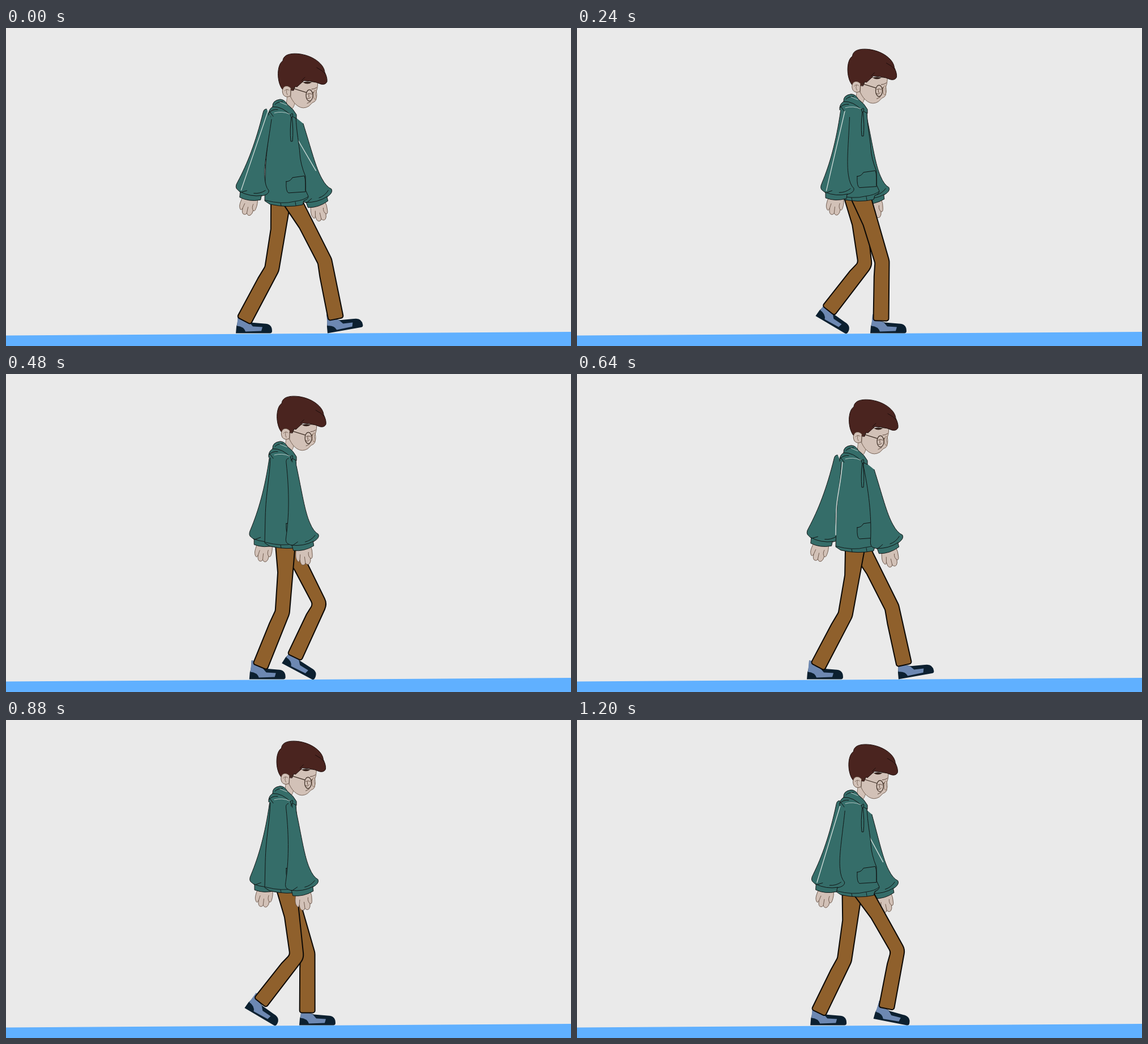
Write an HTML page with a canvas that moves like this. It is 998 px wide and 561 px high and loops after 1.28 s.

```html
<!DOCTYPE html>
<html lang="en">
<head>
<meta charset="utf-8">
<title>Walk cycle</title>
<style>
  html, body { margin: 0; width: 100%; height: 100%; overflow: hidden; background: #eaeaea; }
  canvas { display: block; }
</style>
</head>
<body>
<canvas id="stage" width="998" height="561"></canvas>
<script>
const ctx = document.getElementById('stage').getContext('2d');
const LOOP = 1280, TICK = 80, THIGH = 115, SHIN = 104, GROUND = 538.5;
const INK = '#101313', GREEN = '#356d69', LIGHT = '#d3dfdc', SKIN = '#d2c1b7', LINE = '#5f493c',
      HAIR = '#4a241f', PANTS = '#8f602c', NAVY = '#0c2030', BLUE = '#6d88b2';

const wave = turns => Math.cos(turns * 2 * Math.PI);
const radians = degrees => degrees * Math.PI / 180;
const add = (a, b, k = 1) => [a[0] + b[0] * k, a[1] + b[1] * k];
const unit = ([x, y]) => { const d = Math.hypot(x, y); return [x / d, y / d]; };
const front = ([x, y]) => [y, -x];

function turn([x, y], degrees) {
  const c = Math.cos(radians(degrees)), s = Math.sin(radians(degrees));
  return [x * c - y * s, x * s + y * c];
}

function shape(d, fill, stroke, width = 1) {
  const path = new Path2D(d);
  if (fill) { ctx.fillStyle = fill; ctx.fill(path); }
  if (stroke) { ctx.strokeStyle = stroke; ctx.lineWidth = width; ctx.stroke(path); }
}

function place(x, y, degrees, draw) {
  ctx.save();
  ctx.translate(x, y);
  ctx.rotate(radians(degrees));
  draw();
  ctx.restore();
}

// Heel position and tilt; phase 0 is the heel strike, 0.5 the start of the swing
function footPose(phase) {
  if (phase < .5)
    return { heel: [487 + 81 * wave(phase), GROUND], tilt: -10 * Math.max(0, 1 - 16 * phase) };
  const s = 2 * phase - 1;
  const tilt = 42 * Math.sin(Math.PI * s ** 1.3) - 12 * s * s;
  const lift = 60 * Math.sin(radians(Math.max(0, tilt)));
  return { heel: [406 + 162 * s ** 2.4, GROUND - lift], tilt };
}

function findKnee(hip, ankle) {
  const dx = ankle[0] - hip[0], dy = ankle[1] - hip[1];
  const reach = Math.min(Math.hypot(dx, dy), THIGH + SHIN - 1);
  const along = (reach * reach + THIGH * THIGH - SHIN * SHIN) / (2 * reach);
  const bend = Math.sqrt(THIGH * THIGH - along * along);
  const dir = unit([dx, dy]);
  return add(add(hip, dir, along), front(dir), bend);
}

function shoe() {
  shape('M0,0 L1,-12 Q4,-20 4,-33 Q10,-34 12,-24 L26,-19 L50,-17 Q64,-17 64,-4 Q64,0 60,0 Z', NAVY);
  shape('M2,-13 L4,-33 Q10,-34 12,-24 L24,-19 L30,-12 L47,-11 L45,-4 L17,-3 Q14,-12 2,-13 Z', BLUE);
}

function leg(phase, bob, dx) {
  const { heel, tilt } = footPose(phase);
  place(...heel, tilt, shoe);

  const hip = [499 + 8 * wave(phase) + dx, 311 + .8 * bob];
  const ankle = add(add(heel, turn([19, -22], tilt)), [dx * .8, 0]);
  const knee = findKnee(hip, ankle);
  const thigh = unit(add(knee, hip, -1)), shin = unit(add(ankle, knee, -1));
  const across = front(shin), kneeAcross = front(unit(add(thigh, shin)));
  const backHip = add(hip, [-17, 0]), frontHip = add(hip, [17.5, -4]);
  const backKnee = add(knee, kneeAcross, -12.5);
  const bulge = add(add(backHip, add(backKnee, backHip, -1), .4), [4, 0]);
  const corners = [
    [backKnee, 10],
    [add(add(knee, shin, 26), across, -13.5), 12],
    [add(ankle, across, -13.5), 4],
    [add(ankle, across, 13.5), 4],
    [add(knee, kneeAcross, 13), 22],
    [frontHip, 0]
  ];
  ctx.beginPath();
  ctx.moveTo(...backHip);
  ctx.lineTo(...bulge);
  corners.forEach(([point, radius], i) => {
    if (radius) ctx.arcTo(...point, ...corners[i + 1][0], radius);
    else ctx.lineTo(...point);
  });
  ctx.closePath();
  ctx.fillStyle = PANTS;
  ctx.fill();
  ctx.strokeStyle = '#0b0805';
  ctx.lineWidth = 2;
  ctx.stroke();
}

const armSwing = phase => -1 + 13 * wave(phase - .03);

function arm(phase, bob, near) {
  const a = armSwing(phase);
  place(486 - 1.95 * a, 151 - .45 * a + .6 * bob, a, () => {
    shape('M-12,155 C-15,168 -17,174 -13,180 Q-11,183 -9,178 Q-9,188 -4,188 Q-1,188 0,185 ' +
          'Q3,190 7,187 Q10,184 10,178 Q13,180 14,174 Q16,165 13,154 Z', SKIN, LINE, .8);
    shape('M-9,178 L-7,169 M0,185 L0,174 M10,178 Q6,174 8,167', null, LINE, .8);
    shape('M-3,-2 Q-8,-2 -8,5 C-10,60 -17,100 -27,134 Q-31,145 -24,148 L-19,151 L-18,160 ' +
          'Q0,165 19,157 L19,150 Q32,145 30,138 Q22,132 18,116 C12,95 12,60 9,14', GREEN, INK, .9);
    shape('M-20,150 Q0,156 20,149 M5,148 Q16,147 24,139 M-18,151 L-8,146', null, INK, .9);
    if (near && a > 5) shape('M0,0 L-18,147', null, LIGHT, 1.3);
    if (!near && a < -9) shape('M-8,36 L11,100', null, LIGHT, 1.3);
  });
}

function torso(farSwing) {
  shape('M467,152 L480,141 L505,146 L512,156 C513,185 518,205 519,222 Q520,240 529,262 L529,286 L534,297 ' +
        'Q534,302 526,305 L524,312 Q497,318 466,311 L457,305 L458,260 C459,215 466,190 467,152 Z', GREEN, INK, 1);
  shape('M458,304 Q488,312 510,306 Q526,304 533,298 M485,309 L486,314 M511,307 L512,313', null, INK, .9);
  if (farSwing > 9) shape('M469,152 C467,190 459,215 458,240 L457,284', null, LIGHT, 1.5);
  shape('M495,271 Q502,271 506,264 L527,261 Q530,270 529,289 L499,291 Q494,289 495,271 Z', null, INK, 1);
  shape('M504,157 Q501,180 503,200 L506,200 Q508,180 505,157', null, INK, 1);
}

function hood() {
  shape('M464,154 Q463,144 471,139 Q470,128 484,126 Q492,126 497,135 Q508,143 513,153 L513,160 ' +
        'Q506,154 497,152 Q484,150 472,156 Z', GREEN);
  shape('M464,154 Q463,144 471,139 Q470,128 484,126 Q492,126 497,135 Q508,143 513,153 L513,160 L504,155 ' +
        'M471,139 Q488,138 504,155 M464,150 Q470,143 480,144 M466,148 L472,156 M475,135 Q480,130 489,130', null, INK, 1);
  shape('M474,150 Q488,146 501,152 M484,131 L496,136', null, LIGHT, .8);
  shape('M503,156 Q502,151 506,151 Q508,154 505,158 Z', GREEN, INK, 1);
}

function head() {
  shape('M497,118 L495,136 Q499,143 505,143 Q510,138 511,128 Z', SKIN, LINE, .7);
  shape('M504,96 L551,95 Q551,106 547,116 L548,122 Q549,127 545,130 L541,132 L535,138 ' +
        'Q525,144 516,138 Q508,133 503,122 Z', SKIN, LINE, .8);
  shape('M488,108 C478,95 478,65 489,58 C490,46 505,44 520,46 C545,50 562,65 563,78 Q568,88 567,95 ' +
        'Q564,101 556,99 L548,96 Q536,93 526,93 L514,104 L511,103 L508,110 Z', HAIR, '#1c0d0b', 1);
  shape('M549,70 Q559,75 564,81 M522,93 L528,87', null, '#1c0d0b', 1);
  shape('M503,106 Q497,100 491,104 Q486,110 490,118 Q495,124 502,120 Z', SKIN, LINE, .9);
  shape('M492,111 Q496,106 500,110 M496,109 Q494,114 497,118', null, LINE, .7);
  shape('M525,96 Q532,93 540,96 Q532,101 525,96 Z', '#32201a');
  shape('M540,108 Q545,108 549,105 M532,117 Q536,114 540,117 M535,117 L535,122 M532,124 Q536,126 538,122 ' +
        'M532,133 L538,130', null, '#503a2e', .9);
  shape('M505,106 L531,114 M530,119 a6,10 0 1 0 12,0 a6,10 0 1 0 -12,0 M541,115 L544,113', null, '#3c2d24', 1.2);
  shape('M543,118 a3,8 0 1 0 6,0 a3,8 0 1 0 -6,0', null, '#8d7462', 1);
}

function draw(phase) {
  const other = (phase + .5) % 1;
  const bob = 6 * wave(2 * phase - .03) - 6;
  ctx.fillStyle = '#eaeaea';
  ctx.fillRect(0, 0, 998, 561);
  shape('M0,542.5 L998,536 V561 H0 Z', '#60b0ff');
  arm(other, bob, false);
  leg(other, bob, -6);
  leg(phase, bob, 0);
  place(0, bob, 0, () => torso(armSwing(other)));
  arm(phase, bob, true);
  place(.27 * bob, .87 * bob, 0, head);
  place(0, bob, 0, hood);
}

ctx.lineJoin = ctx.lineCap = 'round';
const start = performance.now();
function frame() {
  const t = (performance.now() - start) % LOOP;
  draw(Math.floor(t / TICK) * TICK / LOOP);
  requestAnimationFrame(frame);
}
frame();
</script>
</body>
</html>
```
